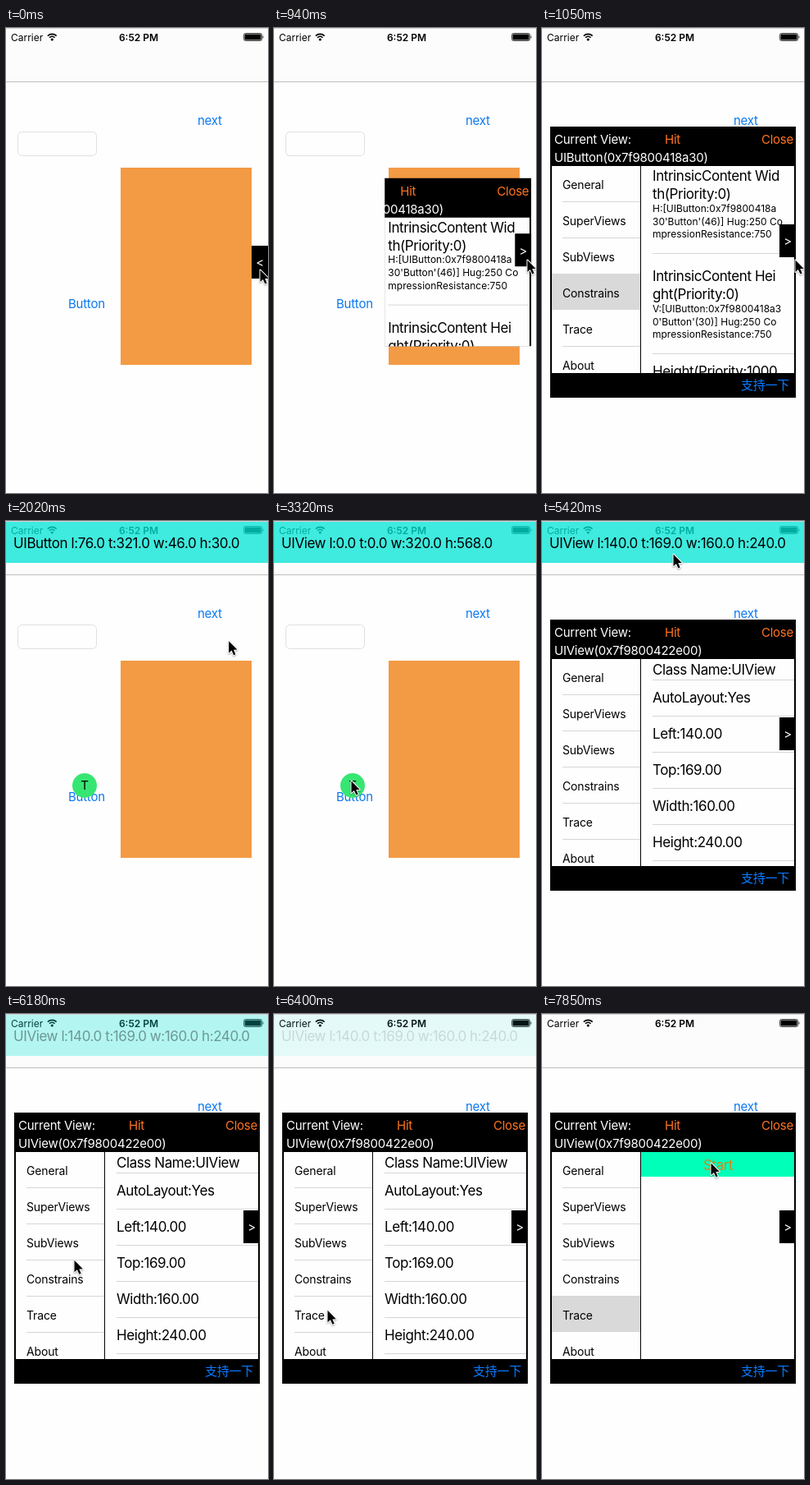
Recreate the animation shown at these times as an HTML page with a canvas. Size 320 px wide and 566 px high, loop 8000 ms.

```html
<!DOCTYPE html>
<html lang="en">
<head>
<meta charset="utf-8">
<title>View inspector</title>
<style>
html, body { margin: 0; width: 100%; height: 100%; overflow: hidden; background: #fefefe; }
canvas { display: block; width: 320px; height: 566px; }
</style>
</head>
<body>
<canvas id="stage"></canvas>
<script>
const W = 320, H = 566, LOOP = 8000;
const canvas = document.getElementById('stage'), c = canvas.getContext('2d');
const dpr = window.devicePixelRatio || 1;
canvas.width = W * dpr;
canvas.height = H * dpr;

const BLUE = '#0a78f0', ORANGE = '#ff7320', LINE = '#d6d6d9';
const TRACKING = { 14: -0.15, 15: -0.24, 17: -0.42 };
const MENU = ['General', 'SuperViews', 'SubViews', 'Constrains', 'Trace', 'About'];
const INFO = ['Class Name:UIView', 'AutoLayout:Yes', 'Left:140.00', 'Top:169.00', 'Width:160.00', 'Height:240.00'];
const RULES = [
  [180, 'IntrinsicContent Wid', 'th(Priority:0)', 'H:[UIButton:0x7f9800418a', "30'Button'(46)] Hug:250 Co", 'mpressionResistance:750'],
  [302, 'IntrinsicContent Hei', 'ght(Priority:0)', 'V:[UIButton:0x7f9800418a3', "0'Button'(30)] Hug:250 Co", 'mpressionResistance:750']
];
// time, x, y of the pointer tip
const POINTER = [
  [300, 310, 294], [590, 309, 282], [1100, 309, 282], [1420, 288, 130], [1880, 288, 130],
  [2670, 94, 316], [3380, 94, 316], [4120, 199, 253], [4180, 201, 254], [4810, 201, 254],
  [5060, 160, 40], [5640, 160, 40], [6390, 65, 360], [6460, 65, 365], [6500, 65, 365],
  [6570, 67, 370], [7200, 67, 370], [7640, 218, 179], [7850, 206, 181]
];

const mix = (a, b, k) => a + (b - a) * k;
const ramp = (t, a, b) => Math.min(1, Math.max(0, (t - a) / (b - a)));
const ease = k => k * k * (3 - 2 * k);

function pointerAt(t) {
  let i = 0;
  while (i < POINTER.length - 2 && t > POINTER[i + 1][0]) i++;
  const [t0, x0, y0] = POINTER[i], [t1, x1, y1] = POINTER[i + 1];
  const k = ease(ramp(t, t0, t1));
  return [mix(x0, x1, k), mix(y0, y1, k)];
}

function box(x, y, w, h, color) {
  c.fillStyle = color;
  c.fillRect(x, y, w, h);
}

// y is the middle of the capital letters
function text(s, x, y, size, color = '#000', align = 'left', weight = 400) {
  c.font = `${weight} ${size}px Inter, "Noto Sans CJK SC", "Noto Sans CJK", sans-serif`;
  c.letterSpacing = (TRACKING[size] || 0) + 'px';
  c.textAlign = align;
  c.fillStyle = color;
  c.fillText(s, x, y + size * 0.364);
}

function disc(x, y, r, color) {
  c.fillStyle = color;
  c.beginPath();
  c.arc(x, y, r, 0, 7);
  c.fill();
}

function statusBar() {
  text('Carrier', 6, 11.5, 12);
  text('6:52 PM', 162, 11.5, 12, '#000', 'center', 600);
  c.strokeStyle = '#000';
  c.lineWidth = 1.7;
  for (const r of [4.6, 7.6]) {
    c.beginPath();
    c.arc(56.3, 15, r, -Math.PI * 0.75, -Math.PI * 0.25);
    c.stroke();
  }
  disc(56.3, 14, 1.6, '#000');
  c.lineWidth = 1;
  c.strokeStyle = '#444';
  c.beginPath();
  c.roundRect(290.5, 6.5, 22, 9, 2);
  c.stroke();
  box(291.5, 7.5, 20, 7, '#000');
  box(313.5, 9.5, 1, 3, '#444');
}

function page() {
  box(0, 0, W, H, '#fefefe');
  box(0, 0, W, 65, '#fcfcfc');
  box(0, 65, W, 1, '#bdbdbd');
  statusBar();
  text('next', 234, 113, 15, BLUE);
  text('Button', 76, 336, 15, BLUE);
  c.strokeStyle = '#e0e0e0';
  c.lineWidth = 1;
  c.beginPath();
  c.roundRect(14.5, 126.5, 96, 29, 5);
  c.stroke();
  box(140, 170, 160, 240, '#f39a44');
}

function constraintList() {
  for (const [y, a, b, ...small] of RULES) {
    text(a, 135, y, 17);
    text(b, 135, y + 22, 17);
    small.forEach((s, i) => text(s, 135, y + 39.5 + i * 15.7, 12));
    box(135, y + 94, 173, 1, LINE);
  }
  text('Height(Priority:1000', 135, 418, 17);
}

function infoList() {
  INFO.forEach((s, i) => {
    text(s, 135, i ? 171 + i * 44 : 181, 17);
    box(135, 193 + i * 44, 173, 1, LINE);
  });
}

function tracePage() {
  box(121, 168, 187, 30, '#00ffb9');
  text('Start', 215, 183.5, 17, '#d08a1c', 'center');
}

function panelContent(t) {
  const first = t < 1730;
  const selected = first ? 3 : t >= 6810 ? 4 : -1;
  text('Current View:', 15, 135.5, 15, '#fff');
  text('Hit', 150, 135.5, 15, ORANGE);
  text('Close', 268, 135.5, 15, ORANGE);
  text(first ? 'UIButton(0x7f9800418a30)' : 'UIView(0x7f9800422e00)', 15, 158, 15, '#fff');
  text('支持一下', 302, 435, 15, '#0a7aff', 'right');

  c.save();
  c.beginPath();
  c.rect(12, 168, 296, 252);
  c.clip();
  box(12, 168, 296, 252, '#fefefe');
  MENU.forEach((s, i) => {
    const y = 168 + i * 44;
    if (i === selected) box(12, y - 1, 108, 44, '#d9d9d9');
    else if (i + 1 !== selected) box(25, y + 43, 95, 1, LINE);
    text(s, 25, y + 22.5, 14);
  });
  box(120, 168, 1, 252, '#000');
  if (first) constraintList();
  else if (t < 6870) infoList();
  else tracePage();
  c.restore();
}

// k runs from the small edge tab (0) to the open panel (1)
function panel(t, k) {
  const x = mix(300, 10, k), y = mix(265, 120, k), w = mix(20, 300, k), h = mix(40, 330, k);
  c.save();
  c.beginPath();
  c.rect(x, y, w, h);
  c.clip();
  box(x, y, w, h, '#000');
  c.translate(x + w - 310, y - 120);
  panelContent(t);
  const top = 120 + 119 * k;
  box(290, top, 20, 40, '#000');
  text(k ? '>' : '<', 300, top + 21, 15, '#fff', 'center');
  c.restore();
}

function outline(x, y, w, h) {
  c.strokeStyle = '#000';
  c.lineWidth = 3;
  c.strokeRect(x + 1.5, y + 1.5, w - 3, h - 3);
}

function infoBar(s, alpha) {
  c.globalAlpha = alpha;
  box(0, 1, W, 50, 'rgba(0,229,213,.75)');
  text(s, 9, 26.5, 17);
  c.globalAlpha = 1;
}

function pointer(x, y) {
  c.save();
  c.translate(x + 0.5, y + 0.5);
  c.beginPath();
  [[0, 0], [0, 14.5], [3.4, 11.4], [5.9, 17], [8.2, 16], [5.8, 10.6], [10.3, 10.4]]
    .forEach(p => c.lineTo(...p));
  c.closePath();
  c.lineJoin = 'round';
  c.lineWidth = 2;
  c.strokeStyle = '#fff';
  c.shadowColor = 'rgba(0,0,0,.35)';
  c.shadowBlur = 2 * dpr;
  c.shadowOffsetY = dpr;
  c.stroke();
  c.shadowColor = 'transparent';
  c.fillStyle = '#000';
  c.fill();
  c.restore();
}

function draw(t) {
  c.setTransform(dpr, 0, 0, dpr, 0, 0);
  const [x, y] = pointerAt(t);
  const picking = t >= 1730 && t < 5420;
  const drag = t < 3320 ? [94, 316] : t < 4500 ? [x, y] : [201, 254];
  const bx = drag[0] + 2, by = drag[1] + 6;
  const inside = bx > 140;

  page();
  if (t >= 3380 && t < 4480) {
    if (inside) outline(140, 170, 160, 240);
    else outline(0, 1, W, H - 1);
  }

  const label = t < 3320 ? 'UIButton l:76.0 t:321.0 w:46.0 h:30.0'
    : inside ? 'UIView l:140.0 t:169.0 w:160.0 h:240.0'
    : 'UIView l:0.0 t:0.0 w:320.0 h:568.0';
  const alpha = t < 1730 ? ramp(t, 1320, 1620) : t < 6460 ? 1 - ramp(t, 5660, 6510) : 0;
  if (alpha) infoBar(label, alpha);
  box(0, 0, W, 1, '#d4d4d4');

  if (picking) {
    disc(bx, by, 15, '#37e672');
    text('T', bx, by, 15, '#000', 'center');
  } else {
    panel(t, t < 1730 ? ease(ramp(t, 810, 1050)) : 1);
  }
  pointer(x, y);
}

function tick() {
  draw(performance.now() % LOOP);
  requestAnimationFrame(tick);
}
tick();
</script>
</body>
</html>
```
